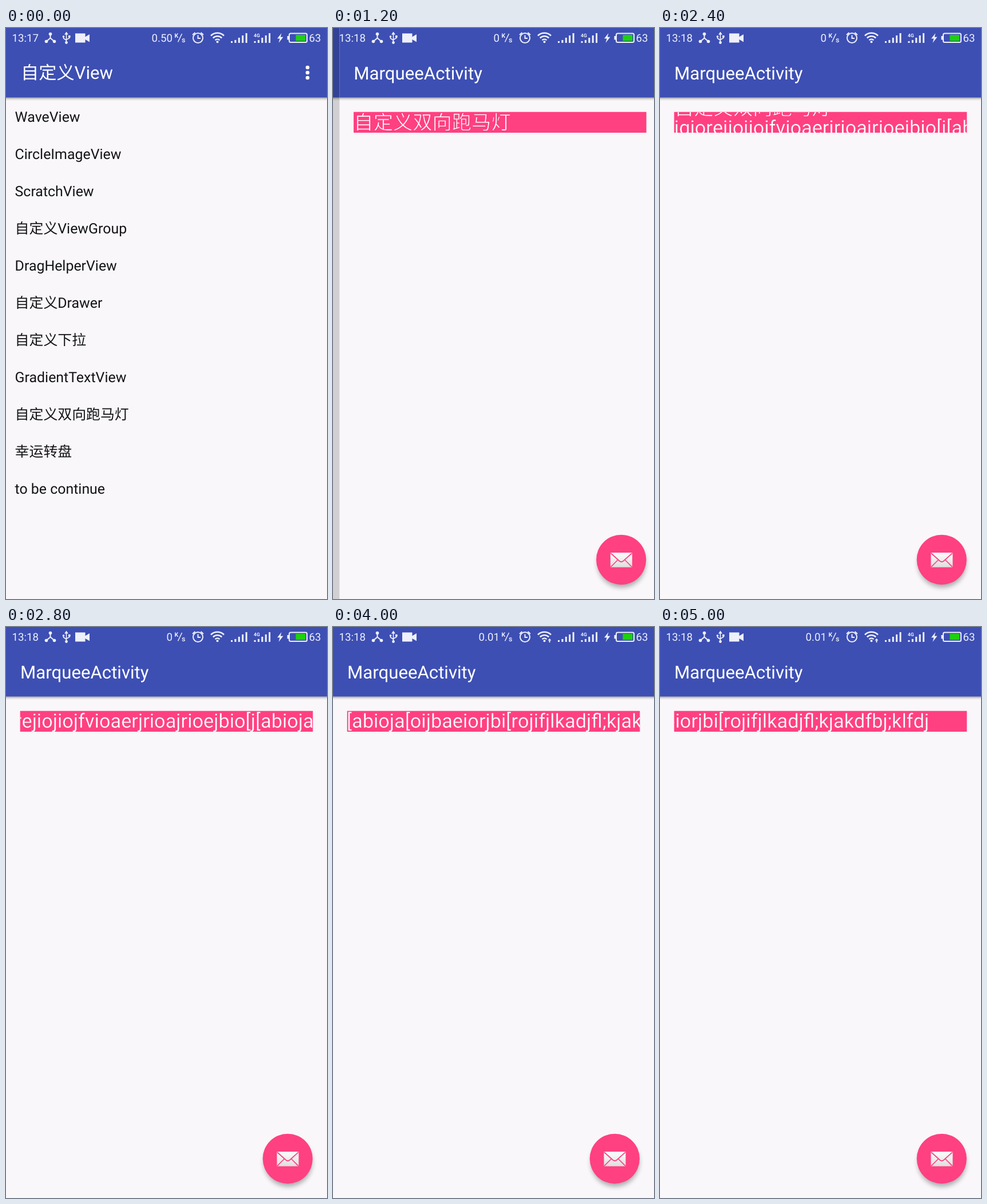
An HTML page for the animation above (5.1 s loop, 561x998 px).

```html
<!DOCTYPE html>
<html lang="zh">
<head>
<meta charset="utf-8">
<title>Marquee</title>
<style>
  html, body { margin: 0; width: 100%; height: 100%; overflow: hidden; background: #f9f7fa; }
  #stage { display: block; width: 561px; height: 998px; }
  text { font-family: Roboto, "Noto Sans CJK SC", "Noto Sans CJK", sans-serif; text-rendering: geometricPrecision; white-space: pre; }
  .title { font-size: 31.2px; fill: #fff; }
  .row { font-size: 24.9px; fill: #141316; }
  /* a background-coloured outline thins the glyphs */
  .run { font-size: 34.3px; fill: #fff; stroke: #ff4081; stroke-width: .4; font-kerning: none; }
  #first { stroke-width: .9; }
  .stat { font-size: 18.7px; fill: #eef0fa; }
  .line { fill: none; stroke: #eef0fa; stroke-width: 2; }
  .solid { fill: #eef0fa; }
</style>
</head>
<body>
<svg id="stage" viewBox="0 0 561 998">
  <defs>
    <linearGradient id="drop" x2="0" y2="1">
      <stop offset="0" stop-color="#000" stop-opacity=".34"/>
      <stop offset=".5" stop-color="#000" stop-opacity=".1"/>
      <stop offset="1" stop-color="#000" stop-opacity="0"/>
    </linearGradient>
    <linearGradient id="paper" x2="0" y2="1">
      <stop offset="0" stop-color="#fdfdfd"/>
      <stop offset="1" stop-color="#dedede"/>
    </linearGradient>
    <filter id="soft" x="-30%" y="-30%" width="160%" height="160%">
      <feGaussianBlur stdDeviation="4"/>
    </filter>
    <g id="page">
      <rect width="561" height="998" fill="#f9f7fa"/>
      <rect width="561" height="121.500" fill="#3d4fb3"/>
      <rect y="121.500" width="561" height="6" fill="url(#drop)"/>
    </g>
  </defs>

  <g id="list">
    <use href="#page"/>
    <text class="title" x="26" y="89">自定义View</text>
    <g fill="#fff">
      <circle cx="527" cy="69" r="3.3"/>
      <circle cx="527" cy="78" r="3.3"/>
      <circle cx="527" cy="87" r="3.3"/>
    </g>
    <g id="rows"></g>
  </g>
  <rect id="scrim" width="561" height="998"/>

  <g id="detail">
    <use href="#page"/>
    <text class="title" x="25" y="90">MarqueeActivity</text>
    <rect x="24.700" y="146.700" width="511.600" height="36.300" fill="#ff4081"/>
    <svg x="25" y="147" width="511.300" height="36">
      <text id="first" class="run" font-weight="300" y="29.5">自定义双向跑马灯</text>
      <text id="second" class="run">jgiorejiojiojfvioaerjrioajrioejbio[j[abioja[oijbaeiorjbi[rojifjlkadjfl;kjakdfbj;klfdj</text>
    </svg>
    <circle cx="493" cy="936" r="42" opacity=".32" filter="url(#soft)"/>
    <circle cx="492.300" cy="929.300" r="43.600" fill="#ff4081"/>
    <rect x="473.500" y="917" width="38" height="25.500" rx="1" fill="url(#paper)"/>
    <path d="M474 918L489 931.5Q492.5 934.5 496 931.5L511 918M474 942L486.500 929.500M511 942L498.500 929.500"
          fill="none" stroke="#ff4081" stroke-width="1.7"/>
  </g>

  <g id="status">
    <text id="clock" class="stat" x="10.500" y="24"></text>
    <path class="line" d="M77.500 11V17.500L70.500 23.500M77.500 17.500L84.500 23.500"/>
    <g class="solid">
      <circle cx="77.500" cy="10.500" r="2.8"/>
      <circle cx="70.500" cy="23.500" r="2.8"/>
      <circle cx="84.500" cy="23.500" r="2.8"/>
      <path d="M105.500 6.500L109 11.500H102Z"/>
      <circle cx="105.500" cy="25.500" r="2.4"/>
      <circle cx="100.500" cy="15" r="1.8"/>
      <rect x="109" y="13" width="3.600" height="3.600"/>
      <path d="M121 9.500H138.500V15.500L146 11V24.500L138.500 20V25.500H121Z"/>
    </g>
    <path class="line" style="stroke-width:1.600" d="M105.500 10V25M100.500 15V18L105.500 21.500M110.800 15V17.500L105.500 20.500"/>

    <text id="rate" class="stat" x="291" y="24" text-anchor="end"></text>
    <text class="stat" x="294.500" y="17" style="font-size:10.500px;font-weight:700">K</text>
    <path class="line" style="stroke-width:1.500" d="M300.500 24.500L307.500 10"/>
    <text class="stat" x="307" y="25" style="font-size:12.500px;font-weight:500">s</text>

    <circle class="line" cx="335.500" cy="17.500" r="8.500"/>
    <path class="line" d="M335.500 12.500V18H340M326 12L330.500 8M345 12L340.500 8"/>

    <path class="line" style="stroke-width:2.500" d="M358 13.500A16.500 16.500 0 0 1 381 13.500M361.800 17.500A11 11 0 0 1 377.200 17.500M365.600 21.300A5.600 5.600 0 0 1 373.400 21.300"/>
    <circle class="solid" cx="369.500" cy="24.300" r="2"/>
    <path id="arrow" class="solid" d="M378.500 20L381.500 23.500H379.500V27H377.500V23.500H375.500Z"/>

    <g id="bars" class="solid"></g>
    <text class="stat" x="433" y="15.500" style="font-size:8.500px;font-weight:700">4G</text>

    <path class="solid" d="M481.500 9L474 18.500H478.500L476.500 26L484.500 15.800H479.800Z"/>
    <rect class="line" x="495" y="9.500" width="31" height="15.500" rx="2.500"/>
    <rect class="solid" x="491.500" y="14" width="3" height="6.500"/>
    <rect x="506.500" y="12" width="17" height="10.500" fill="#1fd010"/>
    <text class="stat" x="529.500" y="24">63</text>
  </g>
</svg>
<script>
  const LOOP = 5100, STEP = 100, WIDTH = 561;
  const SLIDE = { start: 850, time: 408 };
  const RISE = { start: 2000, time: 560, pitch: 34.5 };
  const RUN = { start: 2612, speed: 0.3433, end: 677 };

  const $ = id => document.getElementById(id);
  const clamp = v => Math.min(1, Math.max(0, v));
  const progress = (t, part) => clamp((t - part.start) / part.time);

  function add(parent, tag, attrs, content = '') {
    const el = document.createElementNS('http://www.w3.org/2000/svg', tag);
    for (const key in attrs) el.setAttribute(key, attrs[key]);
    el.textContent = content;
    parent.append(el);
  }

  ['WaveView', 'CircleImageView', 'ScratchView', '自定义ViewGroup', 'DragHelperView', '自定义Drawer',
    '自定义下拉', 'GradientTextView', '自定义双向跑马灯', '幸运转盘', 'to be continue']
    .forEach((label, i) => add($('rows'), 'text', { class: 'row', x: 15.6, y: 164 + 65 * i }, label));

  for (const left of [393, 433.5]) {
    [3, 5, 9, 13, 17].forEach((h, i) =>
      add($('bars'), 'rect', { x: left + 6.4 * i, y: 26 - h, width: 3, height: h }));
  }

  const move = (id, x, y = 0) => $(id).setAttribute('transform', `translate(${x} ${y})`);

  function draw(t) {
    const slide = 1 - (1 - progress(t, SLIDE)) ** 2;
    move('detail', WIDTH * (1 - slide));
    $('scrim').setAttribute('opacity', 0.165 * slide);

    const rise = progress(t, RISE) * RISE.pitch;
    const run = Math.min(RUN.end, Math.max(0, (t - RUN.start) * RUN.speed));
    move('first', 0, -rise);
    move('second', -run, 29 + RISE.pitch - rise);
    $('second').setAttribute('visibility', rise ? 'visible' : 'hidden');

    $('clock').textContent = t < 900 ? '13:17' : '13:18';
    $('rate').textContent = t < 900 ? '0.50' : t < 3100 ? '0' : '0.01';
    $('arrow').setAttribute('visibility', t < 3100 ? 'hidden' : 'visible');
  }

  const origin = performance.now();
  function tick() {
    const t = (performance.now() - origin) % LOOP;
    draw(Math.floor(t / STEP) * STEP);
    requestAnimationFrame(tick);
  }
  tick();
</script>
</body>
</html>
```
